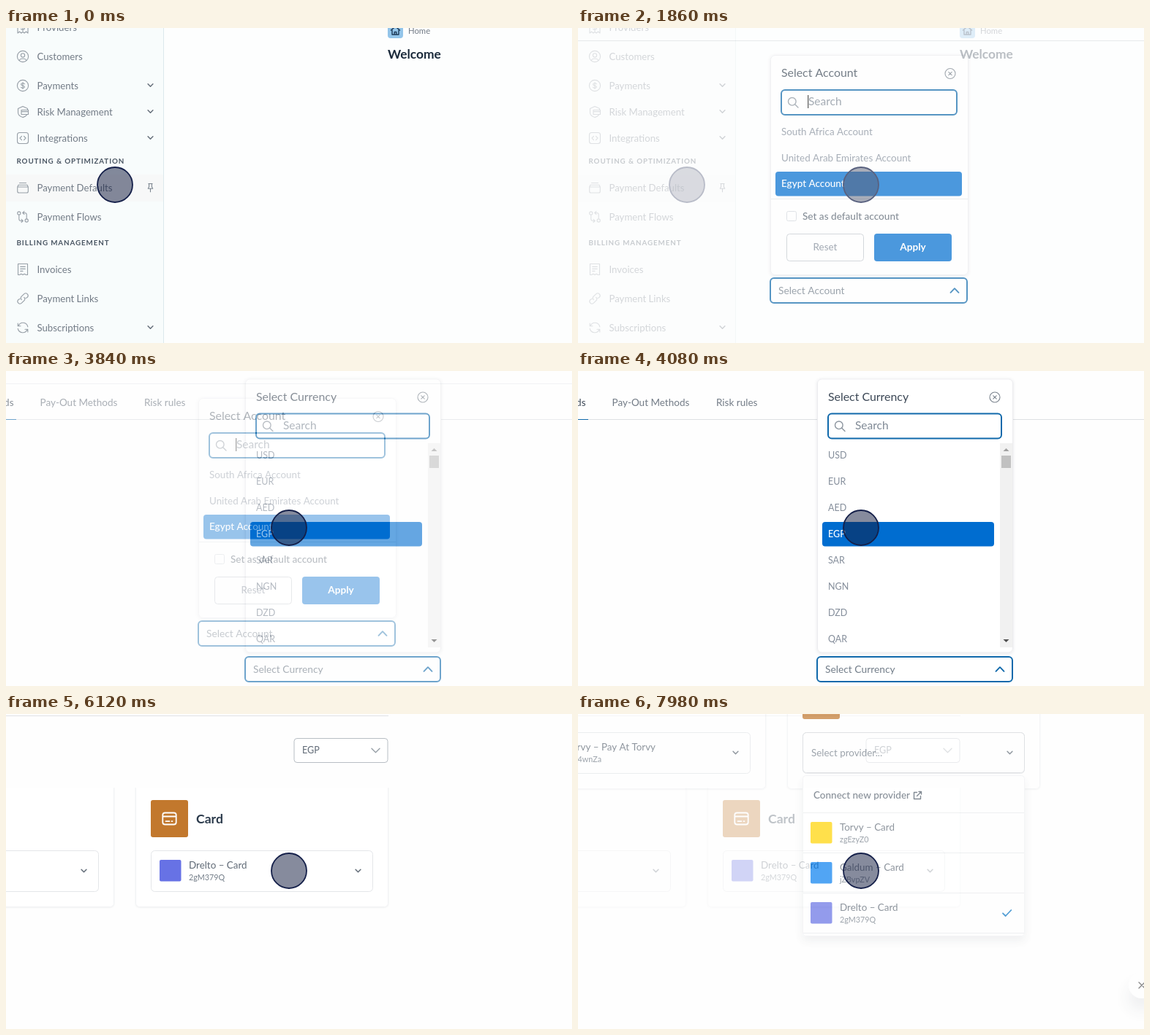
Animation, 774 px wide and 432 px high, one loop 8 s. Source, as an HTML page with a canvas:

```html
<!DOCTYPE html>
<html lang="en">
<head>
<meta charset="utf-8">
<title>Payment routing walkthrough</title>
<style>
html, body { margin: 0; width: 100%; height: 100%; overflow: hidden; background: #fff; }
canvas { display: block; }
</style>
</head>
<body>
<canvas id="stage" width="774" height="432"></canvas>
<script>
const W = 774, H = 432, LOOP = 8000;
const FADES = [1500, 3540, 5580, 7620], STEP = 60, STEPS = 10;
const INK = '#3b4755', SLATE = '#727b86', MUTE = '#858e9b', LINE = '#e4e6e9';
const BLUE = '#006dd0', EDGE = '#1069ab', VIOLET = '#6772e5';

let c; // context of the scene being drawn

function text(str, x, y, size = 13.2, color = SLATE, weight = 400, align = 'left', spacing = 0) {
  c.font = `${weight} ${size}px Lato, "Open Sans", sans-serif`;
  c.letterSpacing = spacing + 'px';
  c.textAlign = align;
  c.fillStyle = color;
  c.fillText(str, x, y + size * 0.35);
}

function box(x, y, w, h, r, fill, stroke, lw = 1) {
  c.beginPath();
  c.roundRect(x, y, w, h, r);
  if (fill) { c.fillStyle = fill; c.fill(); }
  if (stroke) { c.strokeStyle = stroke; c.lineWidth = lw; c.stroke(); }
}

function shadowBox(x, y, w, h, r, blur, dy, shade) {
  c.save();
  c.shadowColor = shade;
  c.shadowBlur = blur;
  c.shadowOffsetY = dy;
  box(x, y, w, h, r, '#fff');
  c.restore();
}

function rule(x, y, w, color = LINE) {
  c.fillStyle = color;
  c.fillRect(x, y, w, 1);
}

// Strokes an SVG path centred on x, y
function icon(d, x, y, color = '#979fa7', lw = 1.1) {
  c.save();
  c.translate(x, y);
  c.strokeStyle = color;
  c.lineWidth = lw;
  c.lineCap = c.lineJoin = 'round';
  c.stroke(new Path2D(d));
  c.restore();
}

const circle = (x, y, r) => `M${x - r} ${y}a${r} ${r} 0 1 0 ${2 * r} 0a${r} ${r} 0 1 0 ${-2 * r} 0`;
const DOLLAR = 'M2.4-2.2C1.6-3.6-2.4-3.6-2.4-1.6C-2.4.4 2.4-.4 2.4 1.7C2.4 3.6-1.8 3.6-2.5 2.2M0-4.4V4.4';
const ICONS = {
  providers: 'M-7-9H7V8L4.5 6L2 8L0 6L-2 8L-4.5 6L-7 8Z' + DOLLAR,
  customers: circle(0, 0, 7.6) + circle(0, -1.6, 2.6) + 'M-4.8 5.6C-3.8 2.2 3.8 2.2 4.8 5.6',
  payments: circle(0, 0, 7.6) + DOLLAR,
  risk: 'M6.5-3V-4.5L0-7.5L-6.5-4.5V1C-6.5 4.5-3.5 6.5 0 7.6C2 7 4 6 5.4 4.4M-2-2.5H7.5V3.5H-2ZM-2-.4H7.5',
  integrations: 'M-4.5-7.5H4.5Q7.5-7.5 7.5-4.5V4.5Q7.5 7.5 4.5 7.5H-4.5Q-7.5 7.5-7.5 4.5V-4.5Q-7.5-7.5-4.5-7.5ZM-1.5-2.6L-4 0L-1.5 2.6M1.5-2.6L4 0L1.5 2.6',
  defaults: 'M-4.5-6.5H4.5M-6-3.8H6M-7.3-1H7.3V5Q7.3 7 5.3 7H-5.3Q-7.3 7-7.3 5ZM-7.3-1L-6-3.8M7.3-1L6-3.8',
  flows: circle(-5.2, -5, 2.1) + circle(5.2, 5, 2.1) + 'M-5.2-2.8V3Q-5.2 5.5-2.5 5.5H0M-2 3.3L.2 5.5L-2 7.7M5.2 2.8V-3Q5.2-5.5 2.5-5.5H0M2-7.7L-.2-5.5L2-3.3',
  invoices: 'M-6.5-7.5H6.5V7.5H4.3L2.2 6.2L0 7.5L-2.2 6.2L-4.3 7.5H-6.5ZM-3.2-3.6H3.2M-3.2-.6H3.2M-3.2 2.4H0',
  links: 'M-1.7 1.7C-3.6-.2-3-1.6-1.8-2.8L1.6-6.2C5-9 9-4.8 6.2-1.6L4-.6M1.7-1.7C3.6.2 3 1.6 1.8 2.8L-1.6 6.2C-5 9-9 4.8-6.2 1.6L-4 .6',
  subscriptions: 'M6.8-1.2C5.4-8-3.6-8.6-6-2.5M-6.8-6V-2.2H-3M-6.8 1.2C-5.4 8 3.6 8.6 6 2.5M6.8 6V2.2H3',
  pin: 'M-2.6-5.5H2.6M-1.9-5.5V-1.2L-3.2 1.2H3.2L1.9-1.2V-5.5M0 1.2V5.8',
  close: circle(0, 0, 7) + 'M-2.2-2.2L2.2 2.2M2.2-2.2L-2.2 2.2',
  lens: circle(-1.2, -1.2, 5.3) + 'M2.7 2.7L7 7',
  down: 'M-3.4-1.7L0 1.7L3.4-1.7',
  wideDown: 'M-5.5-2.7L0 2.7L5.5-2.7',
  up: 'M-5.5 2.8L0-2.8L5.5 2.8',
  card: 'M-6-8H6Q9.2-8 9.2-5V5Q9.2 8 6 8H-6Q-9.2 8-9.2 5V-5Q-9.2-8-6-8ZM-9-3H9M-5 3.6H0M3 3.6H4',
  house: 'M-6-1L0-6L6-1M-4.5-1.5V5H4.5V-1.5M-1.3 5V1.5H1.3V5',
  open: 'M-1-4H-5V5H4V1M-1 1L5-5M1.5-5H5V-1.5',
  tick: 'M-5.5.3L-1.8 4L5.8-4'
};

function cursor(x) {
  c.beginPath();
  c.arc(x, 215, 24, 0, Math.PI * 2);
  c.fillStyle = 'rgba(14,25,60,.5)';
  c.fill();
  c.strokeStyle = '#15204a';
  c.lineWidth = 1.8;
  c.stroke();
}

const MENU = [
  ['providers', 'Providers', -1], ['customers', 'Customers', 39],
  ['payments', 'Payments', 79, 1], ['risk', 'Risk Management', 115, 1],
  ['integrations', 'Integrations', 151, 1], ['defaults', 'Payment Defaults', 219],
  ['flows', 'Payment Flows', 259], ['invoices', 'Invoices', 331],
  ['links', 'Payment Links', 371], ['subscriptions', 'Subscriptions', 411, 1]
];

function home() {
  c.fillStyle = '#fdfefe';
  c.fillRect(0, 0, W, H);
  c.fillStyle = '#f8fcfc';
  c.fillRect(0, 0, 215, H);
  c.fillStyle = '#f7f8f8';
  c.fillRect(0, 201, 215, 37);
  c.fillStyle = '#dce8ec';
  c.fillRect(215, 0, 1, H);
  for (const [name, label, y, more] of MENU) {
    icon(ICONS[name], 23, y);
    text(label, 42.5, y);
    if (more) icon(ICONS.down, 197.5, y - 0.5, '#66707b', 1.5);
  }
  icon(ICONS.pin, 197.5, 219, '#7b858f');
  text('ROUTING & OPTIMIZATION', 14.5, 183, 9.8, '#4a5663', 700, 'left', 0.9);
  text('BILLING MANAGEMENT', 14.5, 295, 9.8, '#4a5663', 700, 'left', 0.9);
  box(522, -8, 21, 22, 4, '#93c5ea');
  icon(ICONS.house, 532.5, 4, '#1d3a58', 1.4);
  text('Home', 550, 4, 11.3);
  text('Welcome', 522, 35.5, 17.4, '#1b2a3b', 700);
  cursor(149);
}

function blank() {
  c.fillStyle = '#fefefe';
  c.fillRect(0, 0, W, H);
}

function popup(x, y, w, h, title) {
  shadowBox(x, y, w, h, 6, 4, 1, 'rgba(40,50,70,.12)');
  box(x + 0.5, y + 0.5, w - 1, h - 1, 6, null, '#ececef');
  text(title, x + 15, y + 24.5, 15.9, INK);
  icon(ICONS.close, x + w - 25, y + 25.5, '#7a838d');
  box(x + 15, y + 48, w - 31, 34, 5, '#fff', EDGE, 2);
  icon(ICONS.lens, x + 31, y + 65, '#8b949e', 1.4);
  text('Search', x + 52, y + 64, 15.5, '#7f8995');
}

function combo(x, y, w, h, label) {
  box(x + 1, y + 1, w - 2, h - 2, 5, '#fff', EDGE, 2);
  text(label, x + 12, y + h / 2, 13.8, '#737e8a');
  icon(ICONS.up, x + w - 18, y + h / 2, EDGE, 1.9);
}

function account() {
  blank();
  rule(0, 17, W, '#dfe2e5');
  popup(263, 37, 271, 302, 'Select Account');
  c.fillStyle = '#222';
  c.fillRect(314, 92, 1.3, 18);
  text('South Africa Account', 278, 142, 13.4, MUTE);
  text('United Arab Emirates Account', 278, 178, 13.4, MUTE);
  box(270, 197, 255, 33.5, 4, BLUE);
  text('Egypt Account', 278, 213, 13.5, '#fff', 500);
  rule(264, 234, 269, '#e4e6e9');
  box(285.5, 251.5, 13, 13, 2, '#fff', '#d3d7dc');
  text('Set as default account', 307, 258, 13.6, '#55606d', 500);
  box(285.5, 282.5, 105, 37, 4, '#fff', '#c4c9cf');
  text('Reset', 338, 300.5, 13.4, MUTE, 500, 'center');
  box(405, 282, 106, 38, 4, BLUE);
  text('Apply', 458, 300.5, 13.6, '#fff', 700, 'center');
  combo(262, 342, 271, 36, 'Select Account');
  cursor(387);
}

function arrow(x, y, dir, color) {
  c.fillStyle = color;
  c.beginPath();
  c.moveTo(x - 4, y + 2 * dir);
  c.lineTo(x + 4, y + 2 * dir);
  c.lineTo(x, y - 2 * dir);
  c.fill();
}

function currency() {
  blank();
  text('ds', 10.5, 43, 13.5, INK, 400, 'right');
  text('Pay-Out Methods', 46.5, 43, 13.5);
  text('Risk rules', 189, 43, 13.5);
  rule(0, 66, W, '#dde0e3');
  rule(0, 66, 14, EDGE);
  popup(327, 10.5, 268, 376, 'Select Currency');
  c.fillStyle = '#f1f1f1';
  c.fillRect(577, 99, 17, 280);
  c.fillStyle = '#c1c1c1';
  c.fillRect(579, 116, 13, 17);
  arrow(585.5, 108, 1, '#a0a0a0');
  arrow(585.5, 370, -1, '#505050');
  box(334, 207, 235, 33.5, 4, BLUE);
  ['USD', 'EUR', 'AED', 'EGP', 'SAR', 'NGN', 'DZD', 'QAR'].forEach((code, i) => {
    const on = code === 'EGP';
    text(code, 342, 116 + i * 35.9, 12.5, on ? '#fff' : MUTE, on ? 500 : 400);
  });
  combo(326, 391, 269, 36, 'Select Currency');
  cursor(387);
}

function providerRow(x, y, color, name, code) {
  box(x, y - 15, 29.5, 29.5, 2, color);
  text(name, x + 40, y - 7.5, 13.4, '#606a76');
  text(code, x + 40, y + 9, 10.8, '#747e89');
}

// Two method cards; the right one starts at x, its field row at y
function cards(x, y) {
  for (const left of [x - 375, x]) {
    shadowBox(left, y - 91, 346, 169, 5, 2, 0.5, 'rgba(40,50,70,.08)');
    box(left + 0.5, y - 90.5, 345, 168, 5, null, '#f1f2f4');
    box(left + 21.5, y + 0.5, 303, 56, 5, '#fff', LINE);
    icon(ICONS.down, left + 304.5, y + 28, '#66707b', 1.6);
  }
  box(x + 21, y - 69, 51, 51, 3, '#c2782d');
  icon(ICONS.card, x + 46.5, y - 43.5, '#fff', 1.8);
  text('Card', x + 83, y - 43, 17.6, '#2c3b4c', 700);
}

function method() {
  blank();
  cards(177, 187);
  c.fillStyle = '#fefefe';
  c.fillRect(0, 90, 530, 11);
  rule(0, 2, 523, '#dfe2e5');
  box(394, 33.5, 128, 33, 4, '#fff', '#b8bec4');
  text('EGP', 405, 50, 12.6, '#606a76');
  icon(ICONS.wideDown, 505.5, 50, '#98a0a8', 1.4);
  providerRow(210, 215, VIOLET, 'Drelto – Card', '2gM379Q');
  cursor(387);
}

function provider() {
  blank();
  cards(286, 25);
  text('Torvy – Pay At Torvy', 106, 45, 13.4, '#606a76', 400, 'right');
  text('4wnZa', 32, 62, 10.8, '#747e89', 400, 'right');
  box(307.5, 25.5, 303, 55, 5, null, '#d3d6da');
  text('Select provider...', 319, 53, 13.4, '#747e89');
  shadowBox(307, 84, 304, 221, 4, 12, 6, 'rgba(40,50,70,.09)');
  box(307.5, 84.5, 303, 220, 4, null, '#f0f1f3');
  text('Connect new provider', 322, 111, 13.5, '#55606d', 500);
  icon(ICONS.open, 464.5, 111.5, '#4c5866', 1.4);
  for (let i = 0; i < 4; i++) rule(308, 135 + i * 55, 302, '#e8eaec');
  providerRow(318, 163, '#ffd400', 'Torvy – Card', 'zgEzyZ0');
  providerRow(318, 218, '#0880f0', 'Galdum – Card', 'jZBvpZV');
  providerRow(318, 273, VIOLET, 'Drelto – Card', '2gM379Q');
  icon(ICONS.tick, 586.5, 273, '#0b76c4', 1.8);
  shadowBox(753, 354, 36, 36, 18, 20, 16, 'rgba(40,50,70,.1)');
  icon('M-4-4L4 4M4-4L-4 4', 771, 372, '#555', 1.3);
  cursor(387);
}

const scenes = [home, account, currency, method, provider].map(draw => {
  const layer = document.createElement('canvas');
  layer.width = W;
  layer.height = H;
  c = layer.getContext('2d');
  draw();
  return layer;
});

const out = document.getElementById('stage').getContext('2d');

function render(t) {
  out.globalAlpha = 1;
  out.drawImage(scenes[0], 0, 0);
  FADES.forEach((start, i) => {
    if (t < start) return;
    out.globalAlpha = Math.min(STEPS, Math.floor((t - start) / STEP) + 1) / STEPS;
    out.drawImage(scenes[i + 1], 0, 0);
  });
}

const begin = performance.now();
function tick() {
  render((performance.now() - begin) % LOOP);
  requestAnimationFrame(tick);
}
tick();
</script>
</body>
</html>
```
